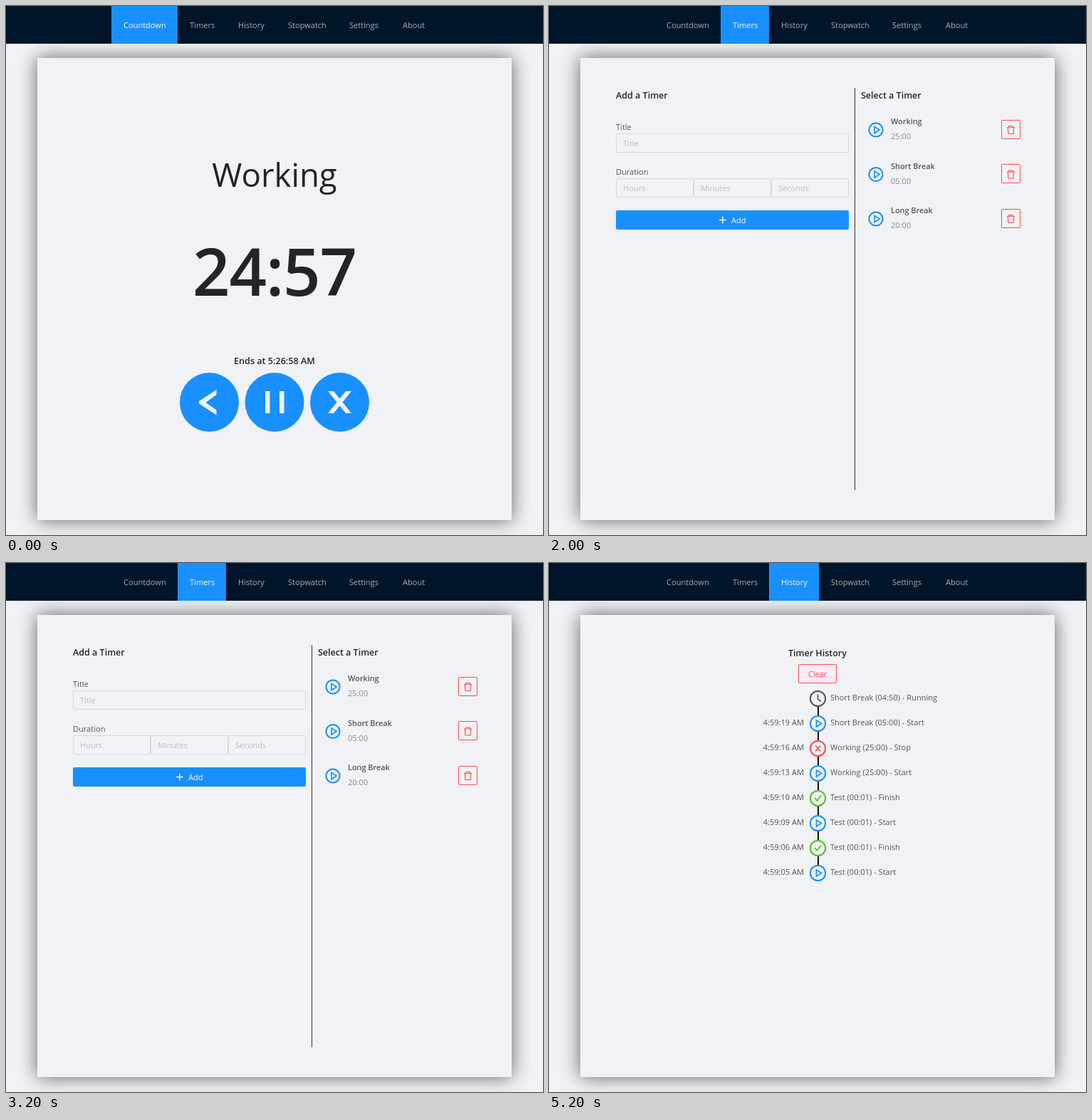
Animation, 754 px wide and 743 px high, one loop 6 s. Source, as an HTML page:

```html
<!DOCTYPE html>
<html lang="en">
<head>
<meta charset="utf-8">
<title>Timer</title>
<style>
  html, body { margin: 0; width: 100%; height: 100%; overflow: hidden; background: #f0f2f5; }
  #stage { position: relative; width: 754px; height: 743px; overflow: hidden; background: #f0f2f5; }
  #card { position: absolute; left: 44px; top: 73px; width: 666px; height: 649px; background: #f0f2f5; box-shadow: 0 0 25px #0009; }
  #nav { position: absolute; left: 0; top: 0; width: 100%; height: 53px; background: #001529; }
  svg { position: absolute; left: 0; top: 0; }
  text { font: 400 11.05px "Open Sans", "Noto Sans", sans-serif; white-space: pre; }
</style>
</head>
<body>
<div id="stage">
  <div id="card"></div>
  <div id="nav"></div>
  <svg id="art" width="754" height="743" viewBox="0 0 754 743"></svg>
</div>
<script>
const BLUE = '#1890ff', RED = '#ff4d4f', GREEN = '#52c41a', PAPER = '#f0f2f5';
const DARK = '#232425', BODY = '#545556', MUTED = '#888a8c', HINT = '#bfbfbf', RULE = '#d9d9d9';
const HOLD = 2000;

const text = (x, y, s, fill = BODY, { size = 11.05, weight = 400, anchor = 'start', gap = 0 } = {}) =>
  `<text x="${x}" y="${y}" fill="${fill}" text-anchor="${anchor}" style="font-size:${size}px;font-weight:${weight};letter-spacing:${gap}em">${s}</text>`;
const rect = (x, y, w, h, fill, extra = '') =>
  `<rect x="${x}" y="${y}" width="${w}" height="${h}" fill="${fill}" ${extra}/>`;
const box = (x, y, w, h, stroke, fill = 'none') =>
  rect(x + .5, y + .5, w - 1, h - 1, fill, `rx="1.5" stroke="${stroke}"`);
const line = (d, color, width) =>
  `<path d="${d}" fill="none" stroke="${color}" stroke-width="${width}"/>`;
const at = (x, y, body) => `<g transform="translate(${x} ${y})">${body}</g>`;

const MARKS = {
  play: ['M-2 -4.6 5 0 -2 4.6Z', BLUE],
  stop: ['M-3.4 -4 3.4 4M3.4 -4 -3.4 4', RED],
  done: ['M-4.2 -.4 -1.2 3.4 4.4 -4', GREEN],
  clock: ['M0 -6V.6L4.2 3.8', BODY]
};
const badge = (x, y, kind, r) => {
  const [d, color] = MARKS[kind];
  return at(x, y, `<circle r="${r}" fill="none" stroke="${color}" stroke-width="2"/>` + line(d, color, 1.7));
};

const tabs = [['Countdown', 148, 241], ['Timers', 241, 309], ['History', 309, 379],
  ['Stopwatch', 379, 465], ['Settings', 465, 540], ['About', 540, 606]];
const label = ([name, left], fill) => text(left + 17, 31, name, fill);
const activeTab = i => rect(tabs[i][1], 0, tabs[i][2] - tabs[i][1], 53, BLUE) + label(tabs[i], '#fff');
const idleTabs = i => tabs.map((t, k) => k === i ? '' : label(t, '#a6adb4')).join('');

const mid = (y, s, size, weight, gap) => text(377, y, s, DARK, { size, weight, gap, anchor: 'middle' });
const heading = { size: 12.5, weight: 600 };

function countdown() {
  const glyphs = [
    'M10 -17.5V-10.5L-5 .5 10 11V18L-14.5 2V-1.5Z',
    'M-13 -15.5h6.5v31h-6.5zM7 -15.5h6.5v31h-6.5z',
    'M-16.5 -15.5h8L16.5 15.5h-8zM8.5 -15.5h8L-8.5 15.5h-8z'
  ];
  return mid(254, 'Working', 45.5, 500) + mid(407, '24:57', 92, 600, -.012) +
    mid(503, 'Ends at 5:26:58 AM', 12.6, 600) +
    glyphs.map((d, i) => at(285.5 + 91.5 * i, 556.5,
      `<circle r="41.5" fill="${BLUE}"/><path d="${d}" fill="${PAPER}"/>`)).join('');
}

function timers() {
  const field = (x, y, w, hint) => box(x, y, w, 27, RULE) + text(x + 10, y + 18, hint, HINT);
  const trash = line('M-5.5 -3.5H5.5M-2.8 -3.5V-5.5H2.8V-3.5M-4.2 -3.5-3.6 5.5H3.6L4.2 -3.5', RED, 1.1);
  const row = ([name, time], i) => {
    const y = 174 + 62.5 * i;
    return badge(459, y, 'play', 9.6) +
      text(480, y - 8, name, BODY, { weight: 600, size: 10.9 }) +
      text(480, y + 13, time, MUTED) +
      box(635, Math.floor(y) - 14, 27, 27, RED) + at(648.5, y, trash);
  };
  return text(94, 130, 'Add a Timer', DARK, heading) + text(438, 130, 'Select a Timer', DARK, heading) +
    rect(429, 115, 1, 565, '#333') +
    text(94, 174, 'Title') + field(94, 179, 327, 'Title') +
    text(94, 237, 'Duration') +
    ['Hours', 'Minutes', 'Seconds'].map((s, i) => field(94 + 109 * i, 242, 109, s)).join('') +
    rect(94, 287, 327, 27, BLUE, 'rx="2"') +
    line('M239 300.5h9.5M243.75 295.75v9.5', '#fff', 1.5) + text(256, 305, 'Add', '#fff') +
    [['Working', '25:00'], ['Short Break', '05:00'], ['Long Break', '20:00']].map(row).join('');
}

function history() {
  const log = [
    ['', 'clock', 'Short Break (04:50) - Running'],
    ['19', 'play', 'Short Break (05:00) - Start'],
    ['16', 'stop', 'Working (25:00) - Stop'],
    ['13', 'play', 'Working (25:00) - Start'],
    ['10', 'done', 'Test (00:01) - Finish'],
    ['09', 'play', 'Test (00:01) - Start'],
    ['06', 'done', 'Test (00:01) - Finish'],
    ['05', 'play', 'Test (00:01) - Start']
  ];
  const entry = ([sec, kind, s], i) => {
    const y = 190.5 + 35 * i;
    return (i ? rect(377, y - 23.5, 2, 12, '#0c0d10') : '') + badge(377.5, y, kind, 10.6) +
      (sec && text(358, y + 2.5, `4:59:${sec} AM`, BODY, { anchor: 'end' })) +
      text(395, y + 2.5, s);
  };
  return mid(131, 'Timer History', 12.5, 600) + box(350, 142, 54, 27, RED, '#ffebf6') +
    text(377, 160, 'Clear', RED, { anchor: 'middle' }) + log.map(entry).join('');
}

const views = [countdown, timers, history];
const art = document.getElementById('art');
art.innerHTML = views.map((view, i) => `<g opacity="0">${activeTab(i)}${idleTabs(i)}${view()}</g>`).join('');

// Each view is fully on for its own third of the loop.
[...art.children].forEach((g, i) => g.animate(
  [0, 1, 2, 3].map(k => ({ opacity: k === i ? 1 : 0, offset: k / 3, easing: 'step-end' })),
  { duration: HOLD * views.length, iterations: Infinity }
));
</script>
</body>
</html>
```
